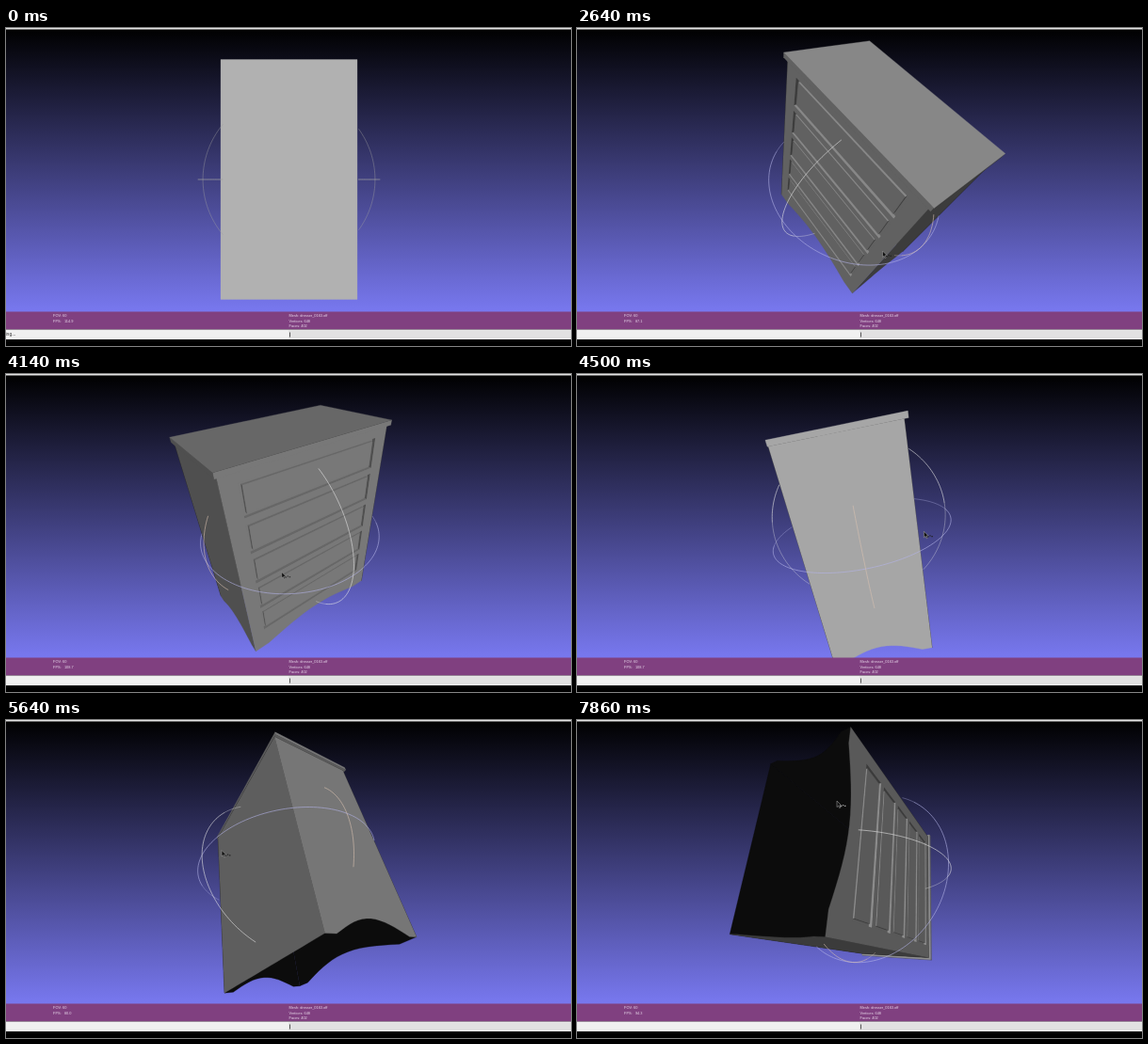
An HTML page that plays this animation: 600x338 px, repeating every 8 s.

```html
<!DOCTYPE html>
<html lang="en">
<head>
<meta charset="utf-8">
<title>Mesh viewer</title>
<style>
  html, body { margin: 0; width: 100%; height: 100%; overflow: hidden; background: #000; }
  svg { display: block; width: 600px; height: 338px; }
  text { font-family: "Liberation Sans", Arial, sans-serif; font-size: 3.9px; fill: #eadcec; white-space: pre; }
</style>
</head>
<body>
<svg viewBox="0 0 600 338" xmlns="http://www.w3.org/2000/svg">
  <defs>
    <linearGradient id="sky" gradientUnits="userSpaceOnUse" x1="0" y1="1" x2="0" y2="321">
      <stop offset="0" stop-color="#000"/><stop offset="1" stop-color="#8080ff"/>
    </linearGradient>
  </defs>
  <rect width="600" height="338" fill="#000"/>
  <rect y="1" width="600" height="301" fill="url(#sky)"/>
  <rect width="600" height="1.5" fill="#e4e4e4"/>
  <g id="scene"></g>
  <rect y="301.5" width="600" height="19" fill="#804080"/>
  <text x="50" y="307.4">FOV: 60</text>
  <text id="fps" x="50" y="312.8"></text>
  <text x="300.5" y="307.4">Mesh: dresser_0163.off</text>
  <text x="300.5" y="312.8">Vertices: 648</text>
  <text x="300.5" y="318.4">Faces: 402</text>
  <rect y="320.5" width="600" height="10.5" fill="#f0f0f0"/>
  <rect x="300" y="321.5" width="300" height="8.5" fill="#e1e1e1"/>
  <rect x="301" y="323.5" width="1" height="5" fill="#555"/>
  <text id="status" x="-.5" y="327.4" style="font-size:5px;fill:#333">ing...</text>
  <g id="cursor">
    <path id="arrow" d="M0 0V6.6L1.6 5.2 2.7 7.6 3.8 7.1 2.7 4.8H4.8Z" stroke-width=".6"/>
    <path id="drag" d="M3.6 5.6h1.6M6 4.6h1.2M8 5.4h1.4" stroke="#222" stroke-width="1.1"/>
  </g>
</svg>
<script>
const LOOP = 8000, CX = 300.5, CY = 161, FOCAL = 277, DIST = 3.03;
const $ = id => document.getElementById(id);

// Half sizes of the bounding box, then the body inside it
const A = .506, B = .89, C = 1.096;
const FRONT = -.48, SIDE = .865, UNDER = C - .045;

// Orientations as quaternions (w, x, y, z)
const poses = [
  [1, 0, 0, 0],
  [.8965, -.2596, .2243, .2817],
  [.3987, -.2289, .3955, .794],
  [.5854, -.145, -.5619, -.5599],
  [.2073, -.2007, -.8481, -.4435],
  [.2676, -.0066, .948, -.1728]
];
const poseTrack = [[1860, 0], [2640, 1], [3500, 1.1], [4140, 2], [4920, 3],
  [5640, 4], [7440, 4.6], [7620, 4.6], [7860, 5]];
const cursorTrack = [[60, 384, 54], [840, 242, 274], [1080, 240, 277.5], [1860, 240, 277.5],
  [2640, 324.5, 237], [3500, 318, 232], [4140, 292.5, 210.5], [4920, 456.5, 117],
  [5640, 229, 138.5], [7440, 262, 120], [7620, 262, 120], [7860, 276, 86]];
const fpsTrack = [[0, '114.9'], [1500, '84.0'], [1860, '92.6'], [2400, '87.1'], [3120, '95.8'],
  [3900, '108.7'], [4560, '87.0'], [5340, '80.0'], [6240, '91.2'], [7620, '94.3']];

function sample(track, t) {
  let i = 0;
  while (i < track.length - 1 && t >= track[i + 1][0]) i++;
  const a = track[i], b = track[i + 1];
  if (!b || t <= a[0]) return a.slice(1);
  const k = (t - a[0]) / (b[0] - a[0]);
  return a.slice(1).map((v, j) => v + (b[j + 1] - v) * k);
}

const dot = (a, b) => a.reduce((s, v, i) => s + v * b[i], 0);

function slerp(a, b, k) {
  let d = dot(a, b);
  const sign = d < 0 ? -1 : 1;
  const w = Math.acos(Math.min(1, d * sign));
  const p = w < 1e-4 ? 1 - k : Math.sin((1 - k) * w);
  const q = (w < 1e-4 ? k : Math.sin(k * w)) * sign;
  const r = a.map((v, i) => v * p + b[i] * q), n = Math.sqrt(dot(r, r));
  return r.map(v => v / n);
}

function matrix([w, x, y, z]) {
  return [
    [1 - 2 * (y * y + z * z), 2 * (x * y - w * z), 2 * (x * z + w * y)],
    [2 * (x * y + w * z), 1 - 2 * (x * x + z * z), 2 * (y * z - w * x)],
    [2 * (x * z - w * y), 2 * (y * z + w * x), 1 - 2 * (x * x + y * y)]
  ];
}

let rot, eye;

function project(p) {
  const s = FOCAL / (DIST - dot(rot[2], p));
  return (CX + s * dot(rot[0], p)).toFixed(2) + ' ' + (CY - s * dot(rot[1], p)).toFixed(2);
}
const outline = pts => 'M' + pts.map(project).join('L') + 'Z';
const faces = (n, p) => dot(n, eye) > dot(n, p);
const fill = (pts, c) => {
  const col = `rgb(${c},${c},${c})`;
  return `<path d="${outline(pts)}" fill="${col}" stroke="${col}" stroke-width=".3"/>`;
};
const lit = n => Math.round(Math.max(12, 177 * dot(rot[2], n)));
const face = f => faces(f.n, f.pts[0]) ? fill(f.pts, lit(f.n)) : '';

// The six sides of a box, as outward faces
function box(lo, hi) {
  const out = [];
  for (let ax = 0; ax < 3; ax++) for (const s of [-1, 1]) {
    const n = [0, 0, 0], u = (ax + 1) % 3, v = (ax + 2) % 3;
    n[ax] = s;
    const pts = [[0, 0], [1, 0], [1, 1], [0, 1]].map(([i, j]) => {
      const p = [];
      p[ax] = s < 0 ? lo[ax] : hi[ax];
      p[u] = i ? hi[u] : lo[u];
      p[v] = j ? hi[v] : lo[v];
      return p;
    });
    out.push({ n, pts });
  }
  return out;
}

// A wall from (x0,y0) to (x1,y1) whose lower edge may be arched
function wall(n, x0, y0, x1, y1, rise) {
  const pts = [[x1, y1, UNDER], [x0, y0, UNDER]];
  for (let i = 0; i <= 20; i++) {
    const s = i / 20, k = Math.min(1, Math.max(0, (s - .1) / .8));
    pts.push([x0 + (x1 - x0) * s, y0 + (y1 - y0) * s, -C + rise * Math.sin(Math.PI * k)]);
  }
  return { n, pts };
}

const plate = box([-A, -B, UNDER], [A, B, C]);
const ceiling = [[FRONT, -SIDE], [A, -SIDE], [A, SIDE], [FRONT, SIDE]].map(p => [...p, UNDER]);
const walls = [
  wall([1, 0, 0], A, -SIDE, A, SIDE, 0),
  wall([0, 1, 0], A, SIDE, FRONT, SIDE, .13),
  wall([0, -1, 0], A, -SIDE, FRONT, -SIDE, .13),
  wall([-1, 0, 0], FRONT, -SIDE, FRONT, SIDE, .13)
];
const drawers = [0, 1, 2, 3, 4].map(i => {
  const z = -.8 + .365 * i, y = .72, gap = .03, deep = FRONT + .03;
  const hole = box([FRONT, -y, z], [deep, y, z + .3]);
  return {
    open: hole[0],
    inner: hole.slice(2).map(f => ({ n: f.n.map(v => -v), pts: f.pts })),
    panel: box([FRONT + .006, -y + gap, z + gap], [deep, y - gap, z + .3 - gap])
  };
});

function drawDrawer(d, i) {
  return `<clipPath id="d${i}"><path d="${outline(d.open.pts)}"/></clipPath><g clip-path="url(#d${i})">` +
    face(d.open) + d.inner.map(face).join('') +
    d.panel.slice(2).map(face).join('') + face(d.panel[0]) + '</g>';
}

function drawBody() {
  const near = walls.filter(w => faces(w.n, w.pts[0]));
  const far = walls.filter(w => !near.includes(w));
  const top = plate.map(face).join('');
  const above = eye[2] > UNDER;
  let s = above ? '' : top + fill(ceiling, 12);
  s += far.map(w => fill(w.pts, 12)).join('') + near.map(face).join('');
  if (near.includes(walls[3])) s += drawers.map(drawDrawer).join('');
  return s + (above ? top : '');
}

// Does the box cover p as seen from the eye?
function hidden(p) {
  const lo = [FRONT, -SIDE, -C], hi = [A, SIDE, C];
  let t0 = 0, t1 = 1;
  for (let i = 0; i < 3; i++) {
    const d = p[i] - eye[i] || 1e-9;
    const a = (lo[i] - eye[i]) / d, b = (hi[i] - eye[i]) / d;
    t0 = Math.max(t0, Math.min(a, b));
    t1 = Math.min(t1, Math.max(a, b));
  }
  return t0 < t1;
}

function drawRing(u, v, color, idle) {
  const N = 180, paths = ['', ''];
  const at = i => {
    const p = [0, 0, 0], a = i / N * 2 * Math.PI;
    p[u] = Math.cos(a);
    p[v] = Math.sin(a);
    return p;
  };
  for (let i = 0; i < N; i++) {
    const p = at(i), q = at(i + 1);
    if (hidden(p) || hidden(q)) continue;
    paths[dot(rot[2], p) > .05 ? 1 : 0] += `M${project(p)}L${project(q)}`;
  }
  return paths.map((d, k) => `<path d="${d}" fill="none" stroke="${idle ? '#a0a0a0' : color}" ` +
    `stroke-width=".7" stroke-opacity="${idle ? .6 : k ? .85 : .5}"/>`).join('');
}

function draw(t) {
  const u = sample(poseTrack, t)[0], i = Math.min(poses.length - 2, Math.floor(u));
  rot = matrix(slerp(poses[i], poses[i + 1], u - i));
  eye = rot[2].map(v => v * DIST);
  const idle = t < 1860;
  $('scene').innerHTML = drawBody() + drawRing(0, 1, '#b4b4e8', idle) +
    drawRing(0, 2, '#e4e4e4', idle) + drawRing(1, 2, '#d8c0b0', idle);

  $('fps').textContent = 'FPS:   ' + fpsTrack.filter(f => f[0] <= t).pop()[1];
  $('status').style.display = t < 1500 ? '' : 'none';

  const [x, y] = sample(cursorTrack, t), arrow = $('arrow');
  $('cursor').style.display = t < 60 ? 'none' : '';
  $('cursor').setAttribute('transform', `translate(${x.toFixed(2)} ${y.toFixed(2)})`);
  arrow.setAttribute('fill', idle ? '#e8e8e8' : '#111');
  arrow.setAttribute('stroke', idle ? '#333' : '#999');
  $('drag').style.display = idle ? 'none' : '';
  $('drag').setAttribute('stroke', y < 130 ? '#aaa' : '#222');
}

const start = performance.now();
function tick() {
  draw((performance.now() - start) % LOOP);
  requestAnimationFrame(tick);
}
tick();
</script>
</body>
</html>
```
